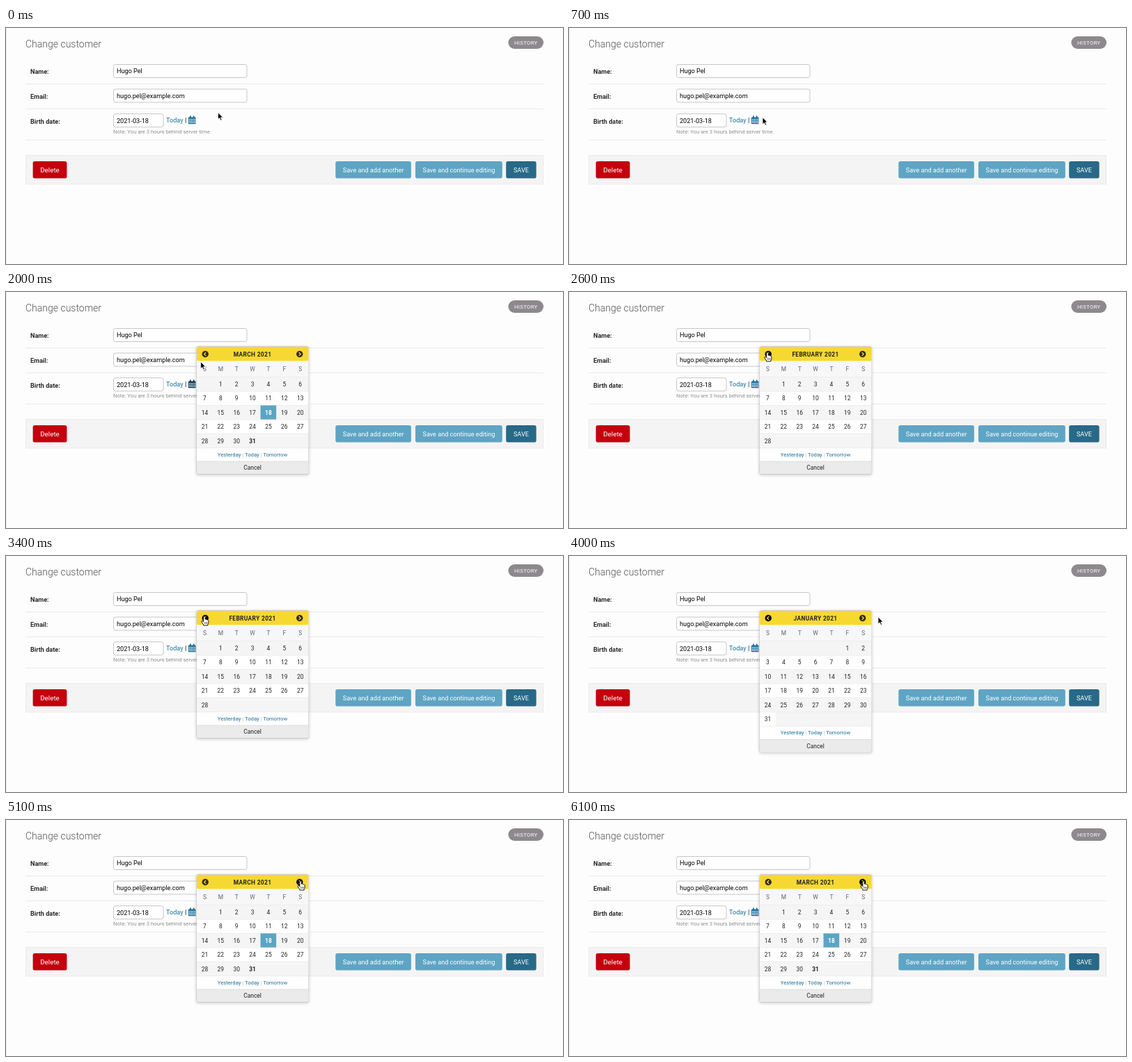
Animation, 800 px wide and 340 px high, one loop 6.2 s. Source, as an HTML page:

```html
<!DOCTYPE html>
<html lang="en">
<head>
<meta charset="utf-8">
<title>Change customer</title>
<style>
  html, body { margin: 0; width: 100%; height: 100%; overflow: hidden; background: #fdfdfd; }
  svg { display: block; width: 800px; height: 340px; }
  text { font: 9.1px Roboto, Arial, sans-serif; fill: #000; white-space: pre; }
  .title { font-size: 14px; font-weight: 300; fill: #555; }
  .label { font-weight: 700; fill: #2b2b2b; }
  .link { fill: #1a709b; }
  .note { font-size: 7.7px; fill: #8f8f8f; }
  .history { font-size: 7.7px; letter-spacing: .35px; fill: #fff; }
  .button { fill: #fff; }
  .delete { font-size: 9.8px; fill: #fff; }
  .mid { text-anchor: middle; }
  .small { font-size: 8.4px; fill: #222; }
  .caption { font-size: 8.4px; font-weight: 700; letter-spacing: .35px; fill: #222; }
  .week { font-size: 8.4px; fill: #666; }
  .quick { font-size: 7.7px; fill: #1a709b; }
  .quick tspan { fill: #bbb; }
  .line { stroke: #ebebeb; }
  .field { fill: #fff; stroke: #c6c6c6; }
  #popup { filter: drop-shadow(0 1.4px 2px rgba(0, 0, 0, .22)); }
</style>
</head>
<body>
<svg viewBox="0 0 800 340">
  <rect width="800" height="340" fill="#fdfdfd"/>
  <path d="M.5 0V340" stroke="#e9e9ea"/>
  <g id="form"></g>
  <g id="icon">
    <path d="M262 128.6h10.4v9.6h-10.4zM264 126.6h1.7v3h-1.7zM268.8 126.6h1.7v3h-1.7z"/>
    <path d="M263 131.6h8.6M263 133.8h8.6M263 136h8.6" stroke="#fdfdfd" stroke-width="1.3" stroke-dasharray="1.5 .85"/>
  </g>
  <g id="popup"></g>
  <g id="arrow">
    <path d="M0 0V9.9L2.3 7.8L3.9 11.4L5.6 10.7L4 7.1H7.1Z" fill="#000" stroke="#fff" stroke-width=".8"/>
  </g>
  <g id="hand">
    <path d="M-1.3 1Q0 -.8 1.2 1V4.6Q2.3 3.8 3 5Q4.3 4.4 4.8 5.8Q6 5.6 6 7V9.5Q5.8 11 5 12V13.4H-1.3V12.2Q-3 10.3 -4.1 8.2Q-4.3 6.6 -2.8 6.9L-1.3 8.2Z"
      fill="#fff" stroke="#000" stroke-width=".9" stroke-linejoin="round"/>
    <path d="M.4 8.5V11.3M2.2 8.5V11.3M4 8.5V11.3" stroke="#000" stroke-width=".6"/>
  </g>
</svg>
<script>
const LOOP = 6200, STEP = 100;
const COL = 22.87, ROW = 20.4, LEFT = 274, TOP = 122.7;
const $ = id => document.getElementById(id);

const text = (x, y, cls, s) => `<text x="${x}" y="${y}" class="${cls}">${s}</text>`;
const box = (x, y, w, h, fill, r = 0) =>
  `<rect x="${x}" y="${y}" width="${w}" height="${h}" rx="${r}" fill="${fill}"/>`;
const rule = (x1, x2, y) => `<path class="line" d="M${x1} ${y}H${x2}"/>`;
const field = (y, w) =>
  `<rect class="field" x="154.5" y="${y}" width="${w}" height="19" rx="2.8"/>`;
const button = (x, w, fill, s, cls = 'button') =>
  box(x, 192, w, 24.6, fill, 2.8) + text(x + w / 2, 207.7, cls + ' mid', s);

$('form').innerHTML =
  text(28, 27.5, 'title', 'Change customer') +
  box(721.4, 12, 50.6, 18, '#8d898c', 9) + text(746.8, 23.8, 'history mid', 'HISTORY') +
  [80.5, 116.5, 161.5].map(y => rule(28, 772, y)).join('') +
  text(35, 66.2, 'label', 'Name:') + field(52.5, 191.5) + text(159, 65.1, '', 'Hugo Pel') +
  text(35, 102, 'label', 'Email:') + field(88, 191.5) + text(159, 100.8, '', 'hugo.pel@example.com') +
  text(35, 137.7, 'label', 'Birth date:') + field(123.7, 71.5) + text(159, 136.5, '', '2021-03-18') +
  text(230, 136, 'link', 'Today') + text(257, 136, '', '|') +
  text(154, 151.8, 'note', 'Note: You are 3 hours behind server time.') +
  '<rect x="28.5" y="183.5" width="743" height="41.5" fill="#f5f4f5" stroke="#ebebeb"/>' +
  button(38.6, 48.8, '#c3000e', 'Delete', 'delete') +
  button(473.3, 108.6, '#5fa4c3', 'Save and add another') +
  button(588, 124.8, '#5fa4c3', 'Save and continue editing') +
  button(718.2, 43.4, '#276987', 'SAVE');

const months = {
  jan: { name: 'JANUARY', first: 5, days: 31 },
  feb: { name: 'FEBRUARY', first: 1, days: 28 },
  mar: { name: 'MARCH', first: 1, days: 31, chosen: 18, today: 31 }
};

function chevron(x, dir, hot) {
  return `<circle cx="${x}" cy="89.5" r="4.7" fill="${hot ? '#000' : '#2f2b1c'}"/>` +
    `<path d="M${x - dir} 87l${2.5 * dir} 2.5l${-2.5 * dir} 2.5" fill="none" stroke="#f7d832" stroke-width="1.3"/>`;
}

function calendar(m, hot) {
  const rows = Math.ceil((m.first + m.days) / 7), end = TOP + rows * ROW;
  let out = box(273.5, 78.3, 161.3, end + 38 - 78.3, '#c8c8c8', 2.8) +
    box(274, 79, 160.3, end + 37.4 - 79, '#fff', 2.4) +
    box(274, 79, 160.3, 20.6, '#f7d832', 2) +
    chevron(286.2, -1, hot === 'left') + chevron(421.7, 1, hot === 'right') +
    text(354, 92.5, 'caption mid', m.name + ' 2021') +
    box(274, 99.6, 160.3, 23, '#f7f7f7');
  [...'SMTWTFS'].forEach((d, i) => out += text(LEFT + (i + .5) * COL, 114, 'week mid', d));
  for (let i = 0; i < rows * 7; i++) {
    const x = LEFT + i % 7 * COL, r = Math.floor(i / 7), y = TOP + r * ROW, d = i - m.first + 1;
    const inside = d > 0 && d <= m.days, chosen = inside && d === m.chosen;
    out += box(x, y, COL + .1, ROW + .1, chosen ? '#5ca4c4' : !inside || r % 2 === 0 && r < 5 ? '#f5f5f5' : '#fff');
    if (inside) {
      const look = chosen ? 'style="fill:#fff;font-weight:700"' : d === m.today ? 'style="font-weight:700"' : '';
      out += `<text x="${x + COL / 2}" y="${y + 13.3}" class="small mid" ${look}>${d}</text>`;
    }
  }
  for (let r = 0; r <= rows; r++) out += `<path d="M274 ${TOP + r * ROW}H434.3" stroke="#e8e8e8" stroke-width=".7"/>`;
  if (m.chosen) {
    const n = m.first + m.chosen - 1;
    out += box(LEFT + n % 7 * COL, TOP + Math.floor(n / 7) * ROW, COL, .6, '#5ca4c4');
  }
  return out +
    text(354, end + 12.2, 'quick mid', 'Yesterday<tspan> | </tspan>Today<tspan> | </tspan>Tomorrow') +
    box(274, end + 19.2, 160.3, 18.2, '#ebebeb', 2) +
    `<path d="M274 ${end + 19.4}H434.3" stroke="#d8d8d8" stroke-width=".8"/>` +
    text(354, end + 31.4, 'small mid', 'Cancel');
}

// [time, x, y] of the pointer's tip
const path = [
  [200, 304.5, 121.8], [500, 290, 126], [900, 266, 131.5], [1800, 266, 131.5],
  [2000, 279.6, 100.6], [2200, 284.9, 86.6], [3500, 284.9, 86.6],
  [3800, 386, 85], [4000, 444, 88], [4200, 423.2, 87.6]
];
const views = [[0, ''], [1500, 'mar'], [2400, 'feb'], [3500, 'jan'], [4400, 'feb'], [5000, 'mar']];
const shapes = [[0, 'arrow'], [900, 'hand'], [1900, 'arrow'], [2200, 'hand'], [3600, 'arrow'], [4200, 'hand']];
const hots = [[0, ''], [2200, 'left'], [4200, 'right']];
const icons = [[0, '#1a709b'], [1000, '#073b59'], [2600, '#1a709b']];

const at = (steps, t) => steps.filter(s => s[0] <= t).pop()[1];

function tip(t) {
  const i = path.findIndex(p => p[0] > t);
  if (i < 0) return path[path.length - 1].slice(1);
  if (i === 0) return path[0].slice(1);
  const a = path[i - 1], b = path[i], k = (t - a[0]) / (b[0] - a[0]);
  return [a[1] + (b[1] - a[1]) * k, a[2] + (b[2] - a[2]) * k];
}

let drawn = '';
function draw(ms) {
  const t = Math.floor(ms % LOOP / STEP) * STEP;
  const view = at(views, t), hot = at(hots, t), shape = at(shapes, t);
  if (drawn !== view + hot) {
    $('popup').innerHTML = view ? calendar(months[view], hot) : '';
    drawn = view + hot;
  }
  $('icon').setAttribute('fill', at(icons, t));
  for (const id of ['arrow', 'hand']) {
    $(id).setAttribute('display', id === shape ? 'inline' : 'none');
    $(id).setAttribute('transform', `translate(${tip(t)})`);
  }
}

const start = performance.now();
function tick() {
  draw(performance.now() - start);
  requestAnimationFrame(tick);
}
tick();
</script>
</body>
</html>
```
